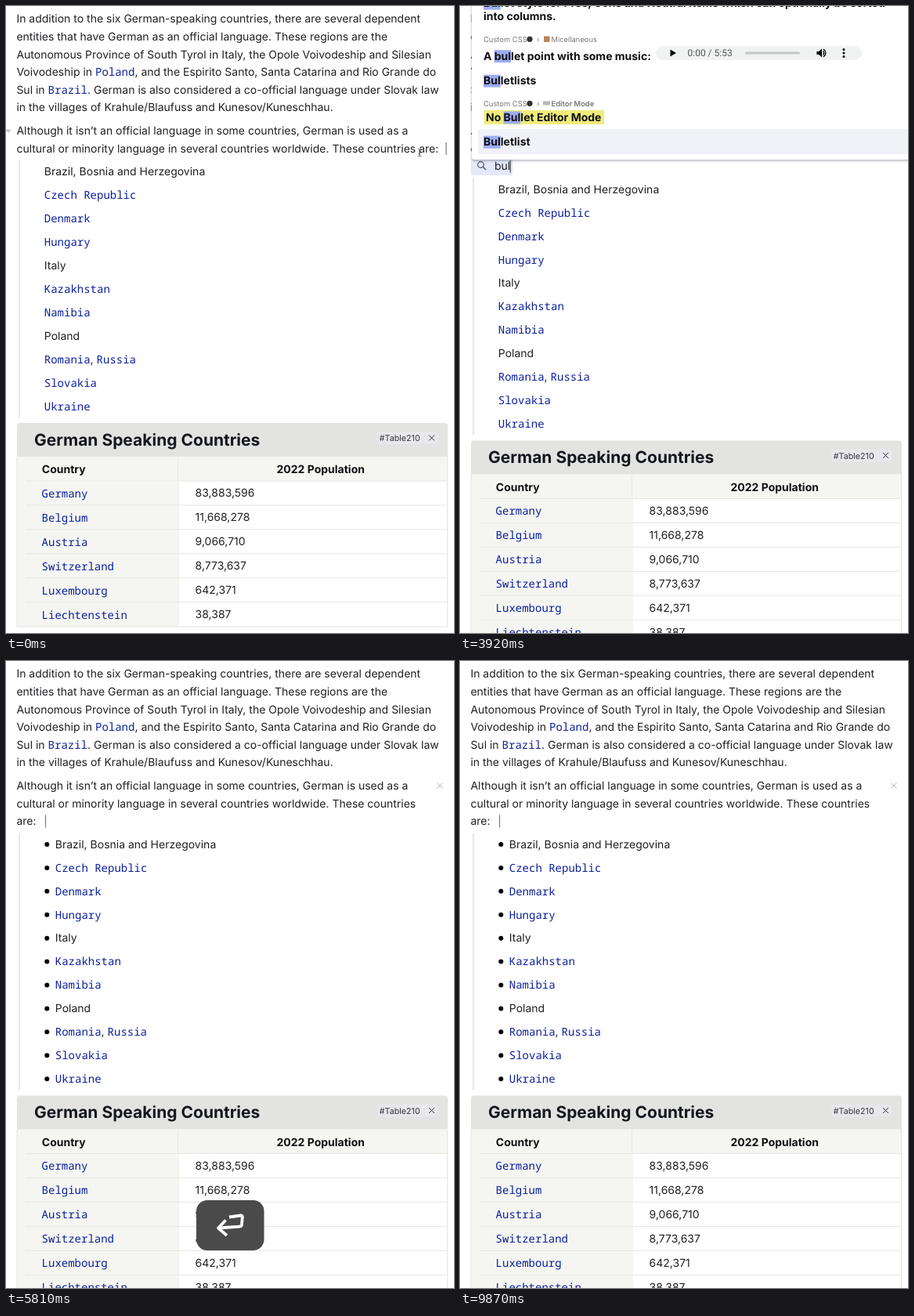
An HTML page that plays this animation: 572x800 px, repeating every 9940 ms.

```html
<!DOCTYPE html>
<html lang="en">
<head>
<meta charset="utf-8">
<title>Bullet list tag</title>
<style>
html, body { margin: 0; width: 100%; height: 100%; overflow: hidden; background: #fff; }
svg { display: block; width: 572px; height: 800px; }
text { font: 14px Inter, sans-serif; font-optical-sizing: none; text-rendering: geometricPrecision; fill: #1f2023; white-space: pre; }
.link { font-family: "Noto Sans Mono", monospace; fill: #0c1f9c; }
.bold { font-weight: 700; fill: #101114; }
.title { font-size: 21px; font-weight: 700; fill: #14171c; }
.chip { font-size: 10.7px; fill: #34363c; }
.crumb { font-size: 9.4px; fill: #777; }
.strong { font-weight: 600; }
.time { font: 12px Roboto, sans-serif; fill: #555; }
.faint { fill: #c8c8d2; }
.hint { fill: #5d6170; }
</style>
</head>
<body>
<svg id="stage" viewBox="0 0 572 800">
  <defs>
    <filter id="shadow" x="-10%" y="-20%" width="120%" height="150%">
      <feDropShadow dx="0" dy="1.5" stdDeviation="1.8" flood-color="#202030" flood-opacity=".35"/>
    </filter>
  </defs>
  <g id="prose"></g>
  <g id="lower">
    <path d="M17 197V525" stroke="#e2e2e2" stroke-width="1.6"/>
    <g id="items"></g>
    <g id="dots"></g>
    <g id="table"></g>
  </g>
  <path id="fold" d="M-1 157.500h8l-4 4.500z" fill="#c6c6c6"/>
  <path id="close" d="M550.500 155.500l7 7m0-7l-7 7" stroke="#bbb"/>
  <path id="caret" stroke="#777" stroke-width="1.200"/>
  <path id="beam" d="M525.500 182q2.500 0 2.500 2v6q0 2-2.500 2M530.500 182q-2.500 0-2.500 2v6q0 2 2.500 2M526.500 188h3" fill="none" stroke="#555" stroke-width=".8"/>
  <g id="search">
    <rect id="field" x="14" y="194" width="153" height="22" rx="2" fill="#e3e8fa"/>
    <circle cx="26.500" cy="202.500" r="3.800" fill="none" stroke="#444b5c" stroke-width="1.200"/>
    <path d="M29.300 205.300l3.700 3.700" stroke="#444b5c" stroke-width="1.300"/>
    <text id="query" x="44" y="209.200"></text>
    <path id="cursor" d="M0 197v15.500" stroke="#444" stroke-width="1.200"/>
    <g id="empty">
      <rect x="15" y="160" width="164.500" height="36" rx="4" fill="#fff" filter="url(#shadow)"/>
      <text class="faint" x="25" y="183.500">Start typing to search</text>
    </g>
    <g id="results"></g>
  </g>
  <g id="key">
    <rect x="243" y="688" width="86.500" height="64" rx="14" fill="#4a4a4a"/>
    <path d="M285 709.500L299.500 707.500Q302 707.300 301.800 709.500L301 719Q300.700 721.500 298 721.700L271.500 723.500M280.500 713.500L271 723.500L282 733" fill="none" stroke="#fff" stroke-width="3.800" stroke-linejoin="round"/>
  </g>
</svg>
<script>
const LOOP = 9940, BLINK = 1050, OPEN = 2520, TYPE = 3570, KEYSTROKE = 140, ENTER = 5600;
const WORD = 'bullet', SHIFT = 22.5;
const $ = id => document.getElementById(id);
const show = (id, on) => $(id).setAttribute('display', on ? 'inline' : 'none');
const links = s => s.replace(/\[(.+?)\]/g, '<tspan class="link">$1</tspan>');
const text = (x, y, s, cls = '') => `<text class="${cls}" x="${x}" y="${y}">${links(s)}</text>`;
const rect = (x, y, w, h, fill, rx = 0) =>
  `<rect x="${x}" y="${y}" width="${w}" height="${h}" rx="${rx}" fill="${fill}"/>`;
const line = (d, color) => `<path d="${d}" stroke="${color}" fill="none"/>`;

const paragraph = [
  'In addition to the six German-speaking countries, there are several dependent',
  'entities that have German as an official language. These regions are the',
  'Autonomous Province of South Tyrol in Italy, the Opole Voivodeship and Silesian',
  'Voivodeship in [Poland], and the Espirito Santo, Santa Catarina and Rio Grande do',
  'Sul in [Brazil]. German is also considered a co-official language under Slovak law',
  'in the villages of Krahule/Blaufuss and Kunesov/Kuneschhau.'
];
const countries = ['Brazil, Bosnia and Herzegovina', '[Czech Republic]', '[Denmark]', '[Hungary]',
  'Italy', '[Kazakhstan]', '[Namibia]', 'Poland', '[Romania], [Russia]', '[Slovakia]', '[Ukraine]'];
const population = { Germany: '83,883,596', Belgium: '11,668,278', Austria: '9,066,710',
  Switzerland: '8,773,637', Luxembourg: '642,371', Liechtenstein: '38,387' };

function buildPage() {
  $('prose').innerHTML =
    paragraph.map((s, i) => text(13.4, 21.3 + 22.6 * i, s)).join('') +
    text(13.4, 164.2, 'Although it isn’t an official language in some countries, German is used as a') +
    text(13.4, 186.8, 'cultural or minority language in several countries worldwide. These countries' +
      '<tspan id="tail"> are:</tspan>') +
    '<text id="wrapped" x="13.4" y="209.3">are:</text>';
  const rowY = i => 216.3 + 29.92 * i;
  $('items').innerHTML = countries.map((s, i) => text(48.8, rowY(i), s)).join('');
  $('dots').innerHTML = countries.map((s, i) => `<circle cx="52.3" cy="${rowY(i) - 4.8}" r="3"/>`).join('');
}

function buildTable() {
  const rows = Object.entries(population);
  $('table').innerHTML =
    rect(14, 575, 549, 31, '#f5f5f1') + rect(14, 606, 207, 186, '#f5f6f2') +
    '<path d="M14 575V536q0-4 4-4h542q4 0 4 4v39z" fill="#e3e3e2"/>' +
    text(36, 560.5, 'German Speaking Countries', 'title') +
    rect(474, 543, 78, 16, '#e7e7ec', 3) +
    text(476.8, 555, '#Table210', 'chip') + line('M540 547.500l7 7m0-7l-7 7', '#333') +
    text(45.8, 596, 'Country', 'bold') +
    text(345.5, 596, '2022 Population', 'bold') +
    line('M219.500 576V605', '#e9e9e6') +
    rows.map(([name, n], i) => {
      const y = 626.9 + 30.95 * i;
      return line(`M25 ${606 + 30.95 * i}H563`, '#e6e6e5') +
        text(45.6, y, `[${name}]`) + text(241.6, y - .5, n);
    }).join('') +
    line('M14 575V792H563.500V575', '#e4e4e2');
}

// One search result; the part that matches the query gets a highlight.
function result(x, y, s) {
  return `<rect class="hit" y="${y - 12.5}" height="16" fill="#9fadf3"/>` +
    text(x, y, s, 'bold entry');
}

function crumb(y, icon, name, cls) {
  return text(30, y, 'Custom CSS', 'crumb') +
    `<circle cx="89" cy="${y - 3.5}" r="3.6" fill="#333"/>` + text(98, y, '›', 'crumb') +
    icon + text(116.5, y, name, 'crumb ' + cls);
}

function buildResults() {
  $('results').innerHTML =
    '<rect x="15" y="-30" width="600" height="226" rx="4" fill="#fff" filter="url(#shadow)"/>' +
    rect(23, 157, 549, 32, '#f1f1f8') + rect(30.5, 133, 153.5, 18, '#f0ec7b') +
    result(30, 1.3, 'Bullet style for Pros, Cons and Neutral items which can optionally be sorted') +
    text(30, 18.3, 'into columns.', 'bold') +
    crumb(45.8, rect(107, 38.5, 7.5, 7.5, '#b9855a', 1), 'Micellaneous', '') +
    result(30, 68.7, 'A bullet point with some music:') +
    rect(250, 51, 263, 18, '#f1f2f2', 9) +
    '<path d="M268.500 55.500v9l7.500-4.500z"/>' + text(290.5, 64.2, '0:00 / 5:53', 'time') +
    rect(364, 58.5, 70, 3, '#c6c6c6', 1.5) +
    '<path d="M455.500 58v4h2.800l3.700 3.500v-11l-3.700 3.500z"/>' +
    '<path d="M463.500 57.500q2.500 2.500 0 5M464 55q6 5 0 10" fill="none" stroke="#000" stroke-width="1.300"/>' +
    [55.5, 60, 64.5].map(y => `<circle cx="490" cy="${y}" r="1.5"/>`).join('') +
    result(30, 100.2, 'Bulletlists') +
    crumb(127.8, rect(106, 121.5, 9, 5, '#b5b5ba', 1), 'Editor Mode', 'strong') +
    result(33, 146.9, 'No Bullet Editor Mode') +
    result(30, 178.2, 'Bulletlist');
}

function highlight(length) {
  const hits = document.querySelectorAll('.hit');
  document.querySelectorAll('.entry').forEach((entry, i) => {
    const start = entry.textContent.toLowerCase().indexOf(WORD);
    const lead = start ? entry.getSubStringLength(0, start) : 0;
    hits[i].setAttribute('x', +entry.getAttribute('x') + lead);
    hits[i].setAttribute('width', entry.getSubStringLength(start, length));
  });
}

let shown = -1;
function setQuery(length) {
  if (length === shown) return;
  shown = length;
  const query = $('query');
  query.textContent = length ? WORD.slice(0, length) : 'Type to add a Tag';
  query.setAttribute('class', length ? '' : 'hint');
  const width = query.getComputedTextLength();
  $('field').setAttribute('width', width + 33);
  $('cursor').setAttribute('transform', `translate(${length ? 44 + width : 43.5} 0)`);
  if (length) highlight(length);
}

function draw(t) {
  const searching = t >= OPEN && t < ENTER, tagged = t >= ENTER, hover = t < 490;
  const typed = Math.max(0, Math.min(WORD.length, Math.floor((t - TYPE) / KEYSTROKE) + 1));
  const blinkStart = tagged ? 6720 - BLINK * 2 : 0;
  const blink = (t - blinkStart) % BLINK < BLINK / 2;

  $('lower').setAttribute('transform', `translate(0 ${t >= OPEN ? SHIFT : 0})`);
  $('items').setAttribute('transform', `translate(${tagged ? 14 : 0} 0)`);
  show('dots', tagged);
  show('tail', !tagged);
  show('wrapped', tagged);
  show('close', tagged);
  show('fold', hover);
  show('beam', hover);
  $('caret').setAttribute('d', tagged ? 'M50.500 196.500v16' : 'M562 174v16');
  show('caret', blink && !searching);

  show('search', searching);
  if (searching) {
    show('empty', !typed);
    show('results', typed > 0);
    show('cursor', t < 3150 || typed > 0 || blink);
    setQuery(typed);
  }

  show('key', tagged && t < 6835);
  $('key').setAttribute('opacity', Math.min(1, Math.max(0, 1 - (t - 6650) / 185)));
}

buildPage();
buildTable();
buildResults();
const begin = performance.now();
function tick() {
  draw((performance.now() - begin) % LOOP);
  requestAnimationFrame(tick);
}
tick();
</script>
</body>
</html>
```
